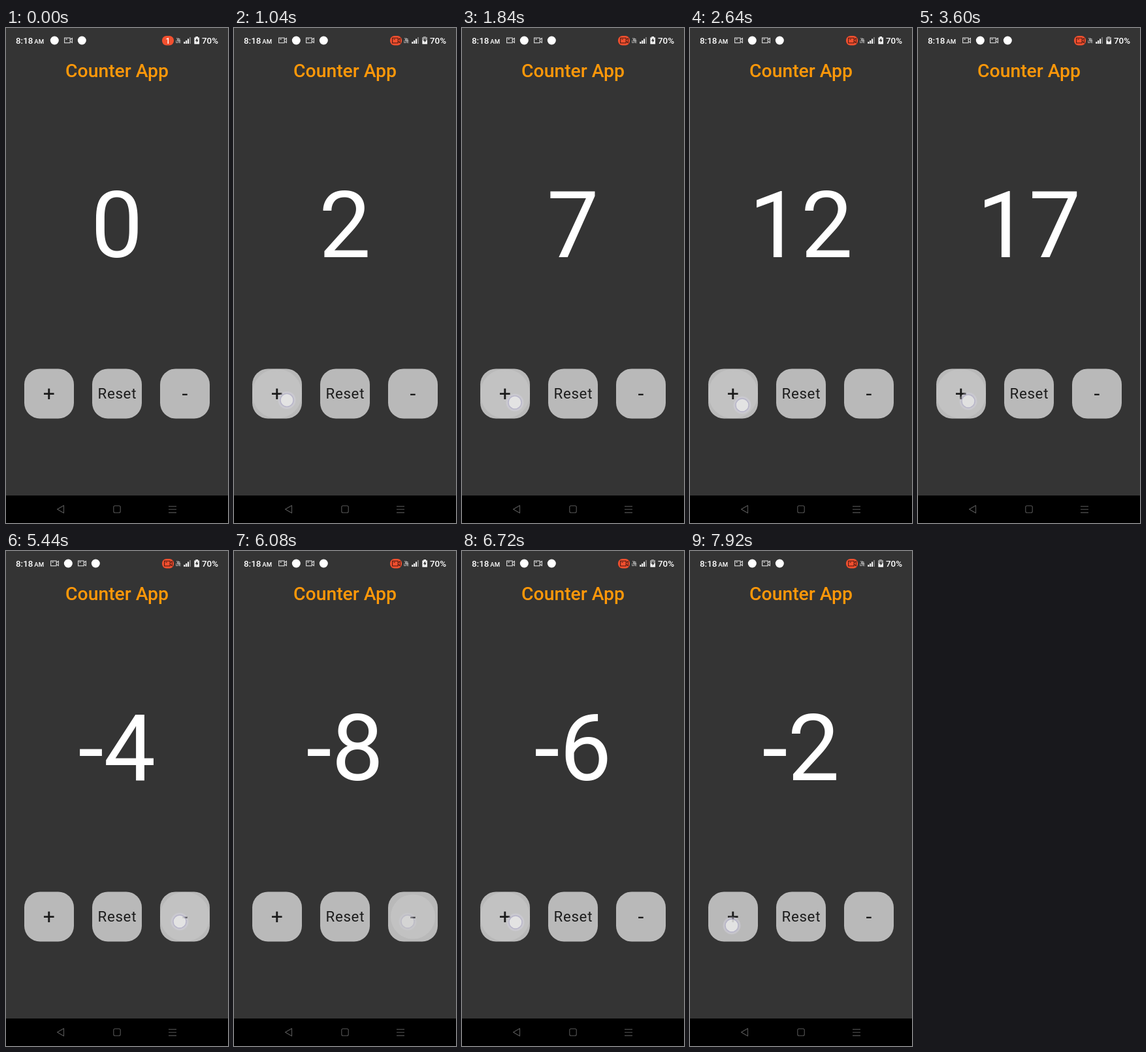
These frames come from a looping animation (340 px wide and 756 px high, 8000 ms). An HTML page:

```html
<!DOCTYPE html>
<html lang="en">
<head>
<meta charset="utf-8">
<title>Counter App</title>
<style>
  html, body { margin: 0; width: 100%; height: 100%; overflow: hidden; background: #343434; }
  svg { display: block; width: 100vw; height: 100vh; font-family: Roboto, sans-serif; }
  .bar { font-weight: 500; font-size: 13.4px; fill: #fff; }
  .tiny { font-size: 4.6px; text-anchor: middle; }
  .label { font-size: 32px; fill: #1b1b1b; text-anchor: middle; }
  .nav { fill: none; stroke: #565656; stroke-width: 1.1; }
</style>
</head>
<body>
<svg viewBox="0 0 340 756">
  <defs>
    <g id="cam" fill="none" stroke-width="1.1">
      <rect x=".6" y=".6" width="8.6" height="7.6"/>
      <path d="M9.2 3.2 12.4 1v7L9.2 5.6M2.4 2.6h2.4"/>
    </g>
    <g id="keys">
      <rect id="key" x="28" y="520.5" width="76" height="76" rx="24"/>
      <use href="#key" x="104"/>
      <use href="#key" x="208"/>
    </g>
    <clipPath id="clip">
      <use href="#key"/><use href="#key" x="104"/><use href="#key" x="208"/>
    </clipPath>
  </defs>
  <rect width="340" height="756" fill="#343434"/>

  <g class="bar">
    <text x="15" y="24">8:18</text>
    <text x="43.3" y="24" font-size="9.6">AM</text>
    <use id="newCam" href="#cam" x="68" y="14.5" stroke="#ddd"/>
    <g id="icons">
      <circle cx="74.3" cy="19" r="6.5"/>
      <use href="#cam" x="89" y="14.5" stroke="#ddd"/>
      <circle cx="116.3" cy="19" r="6.5"/>
    </g>
    <rect x="239" y="12" width="18" height="14.4" rx="6.6" fill="#f2502f"/>
    <text id="badge" x="248" y="23.5" font-size="12" text-anchor="middle">1</text>
    <use id="chipCam" href="#cam" x="242" y="14.7" stroke="#501a12"/>
    <text class="tiny" x="264" y="18.6">Vo</text>
    <text class="tiny" x="264" y="23.4">LTE</text>
    <path d="M272.3 24v-3h2v3zM275.2 24v-5h2v5zM278.1 24v-7.6h2V24z"/>
    <path d="M281 24V14h2v10z" fill="#777"/>
    <path d="M288.4 14.4h2V13h3.6v1.4h2v10.2h-7.6z"/>
    <path id="drain" d="M288.4 14.4h2V13h3.6v1.4h2v4.4h-7.6z" fill="#999"/>
    <path d="M293 15.2l-3.2 4.6h2v3l3-4.5h-1.8z" fill="#343434"/>
    <text x="300" y="24">70%</text>
  </g>

  <text x="170" y="75.1" font-size="28.33" font-weight="500" fill="#ff9809" text-anchor="middle">Counter App</text>
  <text id="count" x="169.8" y="350.4" font-size="141.7" fill="#fff" text-anchor="middle">0</text>

  <use href="#keys" fill="#b9b9b9"/>
  <g clip-path="url(#clip)"><circle id="splash" cy="558.5" fill="#fff"/></g>
  <g class="label">
    <text x="65.8" y="568.7">+</text>
    <text x="170.3" y="566" style="font-size:22.3px" letter-spacing=".7">Reset</text>
    <text x="273.8" y="568.7">-</text>
  </g>
  <g id="touch">
    <circle r="13.5" fill="#d6d4e4" opacity=".45"/>
    <circle r="10" fill="#e9e9e9" stroke="#b5b2cb" stroke-width="1.4"/>
  </g>

  <rect y="714" width="340" height="42"/>
  <path class="nav" stroke-linejoin="round" d="M78.5 735 88.5 729.2V740.8z"/>
  <rect class="nav" x="164.8" y="729.8" width="10.4" height="10.4" rx="2"/>
  <path class="nav" d="M249 730.5h12M249 735.3h12M249 740.1h12"/>
</svg>
<script>
const LOOP = 8000;
const PLUS = 66, RESET = 170, MINUS = 274;
const $ = id => document.getElementById(id);
const set = (id, attrs) => { for (const k in attrs) $(id).setAttribute(k, attrs[k]); };
const show = (id, on) => set(id, { opacity: on ? 1 : 0 });
const clamp = v => Math.max(0, Math.min(1, v));

// Evenly spaced taps on one key; the finger drifts a little with every tap.
const burst = (key, start, gap, count, x, y, dx = 0, dy = 0) =>
  Array.from({ length: count }, (_, i) => ({ key, time: start + i * gap, x: x + i * dx, y: y + i * dy }));

const taps = [
  ...burst(PLUS, 800, 160, 12, 81, 567, 0, .7),
  ...burst(PLUS, 2720, 195, 6, 80, 576, -.6, -1.2),
  ...burst(RESET, 4160, 0, 1, 166, 554),
  ...burst(MINUS, 4800, 180, 8, 266, 566),
  ...burst(PLUS, 6400, 200, 6, 82, 567),
  ...burst(PLUS, LOOP, 0, 1, 64, 572)
];
let total = 0;
for (const tap of taps) {
  total = tap.key === RESET ? 0 : total + (tap.key === PLUS ? 1 : -1);
  tap.value = total;
}

function draw(t) {
  const last = taps.findLast(tap => tap.time <= t) || { time: -LOOP, key: PLUS, value: 0 };
  const age = t - last.time;
  $('count').textContent = last.value;
  set('splash', {
    cx: last.key,
    r: 32 + 6 * clamp(age / 60),
    opacity: .13 * clamp((220 - age) / 100)
  });

  const press = taps.find(tap => t >= tap.time - 100 && t < tap.time + 40);
  show('touch', false);
  if (press) set('touch', {
    transform: `translate(${press.x} ${press.y})`,
    opacity: Math.min(.95, .75 + (t - press.time + 100) / 200, (press.time + 40 - t) / 40)
  });

  const recording = t >= 240;
  show('newCam', recording);
  show('chipCam', recording);
  show('badge', !recording);
  set('icons', { transform: `translate(${recording ? 21 : 0} 0)` });

  const charge = t % 3200;
  show('drain', charge >= 300 && charge < 1700);
}

const start = performance.now();
function frame() {
  draw((performance.now() - start) % LOOP);
  requestAnimationFrame(frame);
}
frame();
</script>
</body>
</html>
```
